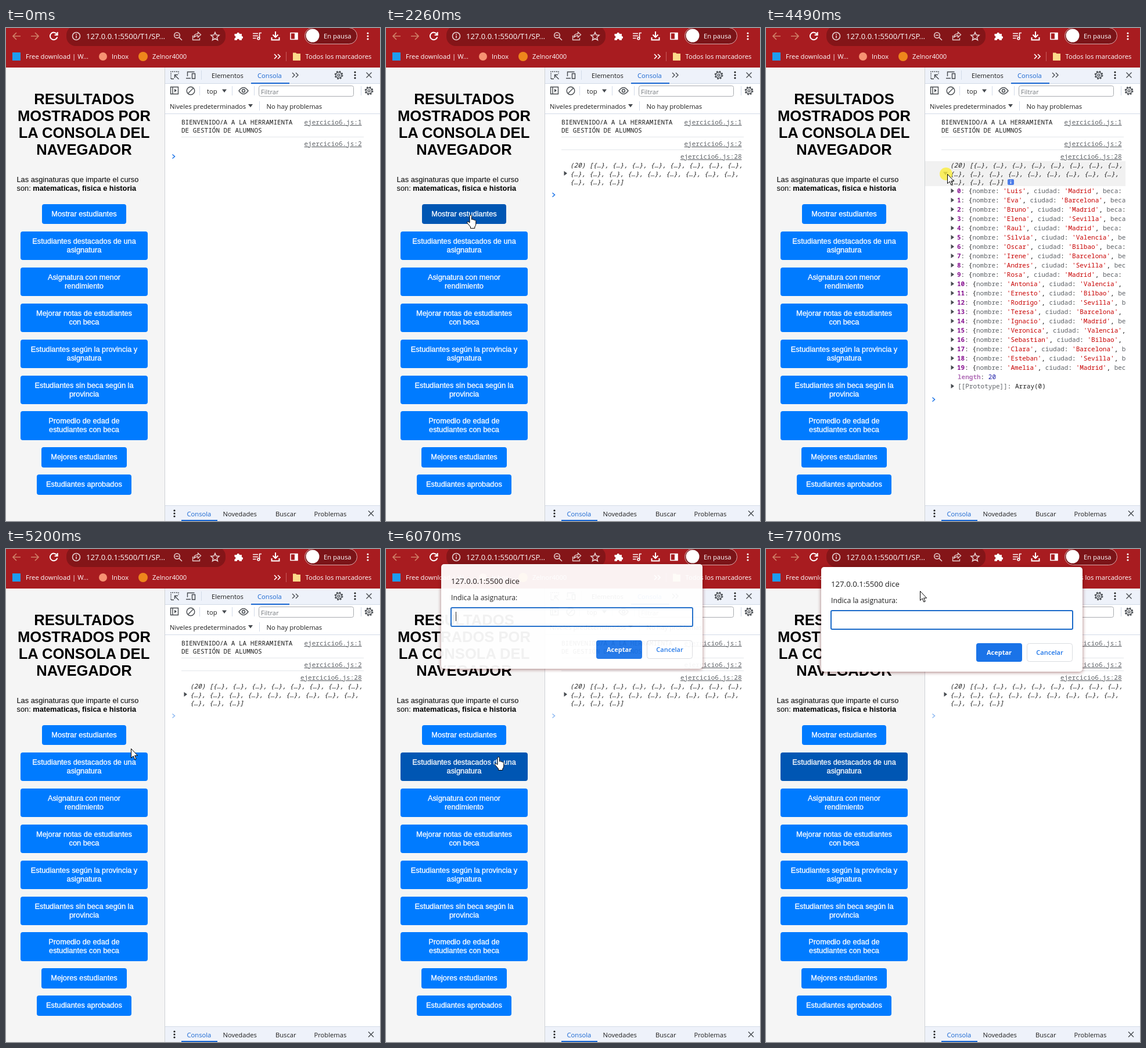
An HTML page for the animation above (8 s loop, 644 by 848 pixels).

```html
<!DOCTYPE html>
<html lang="es">
<head>
<meta charset="utf-8">
<title>Resultados por consola</title>
<style>
html, body { margin: 0; width: 100%; height: 100%; overflow: hidden; background: #fff }
svg { display: block; font: 11.2px "Open Sans", sans-serif; fill: #1f1f1f }
text { white-space: pre }
.page { font: 12.8px "Liberation Sans", Arial, sans-serif; fill: #000 }
.label { fill: #fff; stroke: #fff; stroke-width: .3 }
.mid { text-anchor: middle }
.mono { font: 11px "Noto Sans Mono", monospace }
.link { text-decoration: underline; fill: #5f6368 }
.line { fill: none; stroke: #474b50; stroke-width: 1.4 }
.white { fill: #fff }
.white .line { stroke: #fff; stroke-width: 1.6 }
.sep { fill: none; stroke: #d3dbe8 }
.blue { fill: #1967d2 }
.key { fill: #881391; font-weight: 600 }
.prop { fill: #5f6368 }
.str { fill: #c80000 }
.num { fill: #1a1aa6 }
#dialog { filter: drop-shadow(0 1px 3px #5008) }
</style>
</head>
<body>
<svg id="stage" width="644" height="848" viewBox="0 0 644 848"></svg>
<script>
const text = (x, y, s, attrs = '') => `<text x="${x}" y="${y}" ${attrs}>${s}</text>`;
const path = (d, attrs = 'class="line"') => `<path d="${d}" ${attrs}/>`;
const rect = (x, y, w, h, fill, attrs = '') =>
  `<rect x="${x}" y="${y}" width="${w}" height="${h}" fill="${fill}" ${attrs}/>`;
const disc = (x, y, r, attrs = 'class="line"') => `<circle cx="${x}" cy="${y}" r="${r}" ${attrs}/>`;
const group = (id, body, attrs = '') => `<g id="${id}" ${attrs}>${body}</g>`;
const dots = (x, y) => [-5, 0, 5].map(d => disc(x, y + d, 1.6, '')).join('');
const gear = (x, y) => disc(x, y, 6.4, 'class="line" style="stroke-width:2" stroke-dasharray="2.6 2.43"')
  + disc(x, y, 5) + disc(x, y, 1.9);
const cross = (x, y) => path(`M${x - 4.5} ${y - 4.5}l9 9m0-9l-9 9`);
const chevrons = (x, y) => path(`M${x - 5} ${y - 4}l4 4-4 4m6-8l4 4-4 4`);
const down = (x, y) => path(`M${x - 4} ${y - 2.5}h8l-4 5.5z`, 'fill="#474b50"');
const right = (x, y) => path(`M${x - 2.5} ${y - 4}v8l5.5-4z`, 'fill="#474b50"');

// Browser frame
function browserBar() {
  const dim = 'fill="none" stroke="#d08068" stroke-width="1.7"';
  return rect(0, 0, 644, 68, '#a81c20') + rect(104, -4, 274, 35, '#841518', 'rx="16"')
    + path('M25 14H12m6-6l-6 6 6 6', dim) + path('M43 14h13m-6-6l6 6-6 6', dim)
    + rect(514.5, -.5, 90, 28, '#7b1418', 'rx="14" stroke="#dcaaab"') + disc(528, 13, 11.5, 'fill="#fff"')
    + '<g class="white">'
    + path('M87.5 10.5a6.3 6.3 0 1 0 .8 5M88.7 7v5h-5', 'class="line" style="stroke-width:2"')
    + `<g opacity=".8">${disc(121, 14, 6.5)}${path('M121 13v4.5m0-7.5v1.7')}`
    + disc(294.5, 12.5, 4.7) + path('M298 16l5 5m-11-8.5h5')
    + path('M321.5 13v7.5h12V17M323.5 16c0-4 3-6 7-6V7l5 4.5-5 4.5v-3c-3 0-5 1-7 3z', 'class="line" style="stroke-width:1.3"')
    + path('M360 7.5l2 4.6 5 .4-3.8 3.3 1.2 5-4.4-2.7-4.4 2.7 1.2-5-3.8-3.3 5-.4z') + '</g>'
    + path('M393.5 10h4a2.2 2.2 0 0 1 4.400 0h4v4a2.2 2.2 0 0 1 0 4.400V21h-4a2.2 2.2 0 0 0-4.400 0h-4v-3.500a2 2 0 0 0 0-4z', '')
    + path('M425 9.5h9m-9 4h9m-9 4h5.5M436.5 18V8.5h3.5') + disc(434.8, 18, 2)
    + path('M464 6v10m-4.5-4.5l4.5 4.5 4.5-4.5M457.5 16v4.5h13V16', 'class="line" style="stroke-width:2"')
    + path('M490 8.5h12v11h-12z') + rect(497, 8, 5, 12, '#fff') + dots(623, 14)
    + text(138, 18.5, '127.0.0.1:5500/T1/SP...', 'font-size="13"')
    + text(547, 18, 'En pausa')
    + text(34, 53, 'Free download | W...') + text(182, 53, 'Inbox') + text(252, 53, 'Zelnor4000')
    + text(515.5, 53, 'Todos los marcadores') + chevrons(467, 49) + '</g>'
    + rect(11, 42, 14, 14, '#1e9cf0') + disc(167, 49, 7, 'fill="#f79272"') + disc(236, 49, 8, 'fill="#ee861c"')
    + path('M482.5 41v16', 'stroke="#c95a5d"') + path('M494 42.5h5l1.5 1.5h6.5v12h-13z', 'fill="#fbd98a"');
}

// Web page
const buttons = [
  [62, 303, 145, 34, 'Mostrar estudiantes'],
  [25, 350, 219, 49, 'Estudiantes destacados de una', 'asignatura'],
  [25, 412, 219, 49, 'Asignatura con menor', 'rendimiento'],
  [25, 474, 219, 49, 'Mejorar notas de estudiantes', 'con beca'],
  [25, 536, 219, 49, 'Estudiantes según la provincia y', 'asignatura'],
  [25, 598, 219, 49, 'Estudiantes sin beca según la', 'provincia'],
  [25, 659, 219, 50, 'Promedio de edad de', 'estudiantes con beca'],
  [61, 721, 147, 35, 'Mejores estudiantes'],
  [53, 768, 163, 35, 'Estudiantes aprobados']
];
function webPage() {
  const title = ['RESULTADOS', 'MOSTRADOS POR', 'LA CONSOLA DEL', 'NAVEGADOR'];
  return rect(0, 68, 273, 780, '#f5f5f5') + '<g class="page">'
    + title.map((s, i) => text(134.5, 131 + 29 * i, s, 'class="mid" font-size="25.6" font-weight="bold"')).join('')
    + text(18.5, 265, 'Las asginaturas que imparte el curso')
    + text(18.5, 280, 'son: <tspan font-weight="bold">matematicas, fisica e historia</tspan>')
    + buttons.map(([x, y, w, h, ...lines], i) => rect(x, y, w, h, '#007bff', `rx="4" id="button${i}"`)
      + lines.map((s, n) => text(134.5, y + 21 + 15 * n, s, 'class="mid label"')).join('')).join('')
    + '</g>';
}

// Developer tools
function devTools() {
  return rect(274, 68, 370, 27, '#eef2fa') + rect(274, 822, 370, 26, '#eef2fa')
    + path('M273.5 68v780', 'stroke="#cfd2d6"')
    + path('M274 95.5h370M336.5 73v16M333.5 100v16M389.5 100v16M427.5 100v16M611.5 100v16M436.5 126v16M274 147.5h370M274 821.5h370', 'class="sep"')
    + rect(422, 94, 66, 2, '#1967d2') + rect(302, 846, 62, 2, '#1967d2')
    + path('M284 87V75h13v4', 'class="line" stroke-dasharray="2 1.5"') + path('M284 87.5h5M297.5 88l-7-7m0 5v-5.5h5.5')
    + path('M312.5 83v-7.5h12M310 86.5h8') + path('M320.5 78.5h5v8.5h-5z')
    + text(354, 86, 'Elementos') + text(433, 86, 'Consola', 'class="blue"') + chevrons(498, 81)
    + gear(573, 81) + dots(601, 81) + cross(625, 81)
    + path('M283.5 101.5h13v12h-13zM287 101.5v12') + path('M290 104.5v6l4-3z', 'fill="#474b50"')
    + disc(318, 108, 6.8) + path('M313.3 112.7l9.4-9.4')
    + text(346, 113, 'top') + down(376, 108)
    + path('M401 108q8-11 16 0q-8 11-16 0z') + disc(409, 108, 2.5)
    + rect(435.5, 99.5, 163, 18, '#fff', 'rx="3" stroke="#a8abb0"') + text(439, 113.5, 'Filtrar', 'fill="#75797e"')
    + gear(625, 108)
    + text(282, 139, 'Niveles predeterminados') + down(421, 133.5) + text(448.5, 139, 'No hay problemas')
    + dots(290, 835) + text(311.5, 840, 'Consola', 'class="blue"') + text(373.5, 840, 'Novedades')
    + text(464, 840, 'Buscar') + text(530.5, 840, 'Problemas') + cross(628.5, 835);
}

// Console output
const names = 'Luis Eva Bruno Elena Raul Silvia Oscar Irene Andres Rosa Antonia Ernesto Rodrigo Teresa Ignacio Veronica Sebastian Clara Esteban Amelia'.split(' ');
const cities = ['Madrid', 'Barcelona', 'Sevilla', 'Valencia', 'Bilbao'];
const cityOf = [...'01020341203421034120'];
const span = (cls, s) => `<tspan class="${cls}">${s}</tspan>`;
const items = n => Array(n).fill('{…}').join(', ');

function consoleLog() {
  const link = (y, n) => text(612.5 - 6.6 * (14 + n.length), y, 'ejercicio6.js:' + n, 'class="link"');
  const rows = names.map((name, i) => right(321, 280 + 16 * i) + text(329, 284 + 16 * i,
    `${span('key', i)}: {${span('prop', 'nombre')}: ${span('str', `'${name}'`)}, ${span('prop', 'ciudad')}: `
    + `${span('str', `'${cities[cityOf[i]]}'`)}, ${span('prop', 'beca')}: true`)).join('');
  const italic = 'font-style="italic"';
  return '<g class="mono">' + text(302, 166, 'BIENVENIDO/A A LA HERRAMIENTA') + text(302, 180, 'DE GESTIÓN DE ALUMNOS')
    + link(166, '1') + link(203, '2') + path('M302 187.5h314', 'stroke="#e3e6ea"')
    + group('log', rect(274, 229, 345, 43, '#f1f1f1', 'id="rowHover"')
      + path('M302 209.5h314', 'stroke="#e3e6ea"') + link(225, '28')
      + text(317, 240, `(20) [${items(8)},`, italic) + text(317, 254.5, items(9) + ',', italic)
      + text(317, 269, items(3) + ']', italic)
      + group('closed', right(309, 250))
      + group('open', down(309, 250) + rect(416, 260, 11, 10, '#4d7de8', 'rx="2"')
        + path('M421.5 264v4m0-6.5v1.3', 'stroke="#fff" stroke-width="1.3"')
        + `<clipPath id="clip"><rect x="274" y="272" width="345" height="360"/></clipPath><g clip-path="url(#clip)">${rows}</g>`
        + text(330, 604, `<tspan fill="#b26fb8" font-weight="600">length</tspan>: ${span('num', '20')}`)
        + right(321, 616) + text(330, 620, `${span('prop', '[[Prototype]]')}: Array(0)`)))
    + '</g>' + path('M286.5 217.5l4 3.5-4 3.5', 'id="prompt" fill="none" stroke="#1a73e8" stroke-width="1.5"');
}

function promptDialog() {
  return rect(95, 31, 450, 180, '#fff', 'rx="5"')
    + text(112, 65, '127.0.0.1:5500 dice', 'font-size="13.2"') + text(112, 93, 'Indica la asignatura:', 'font-size="12.3"')
    + rect(112, 106, 416, 32, '#fff', 'rx="2" stroke="#1b6ac9" stroke-width="2"')
    + rect(120, 113, 1, 16, '#222', 'id="caret"')
    + rect(362, 162, 79, 32, '#1a73e8', 'rx="4"') + rect(449.5, 162.5, 78, 31, '#fff', 'rx="4" stroke="#dadce0"')
    + text(401.5, 182, 'Aceptar', 'class="mid white" font-weight="700" font-size="11"')
    + text(488.5, 182, 'Cancelar', 'class="mid" fill="#1a73e8" font-weight="600" font-size="11"');
}

function pointer() {
  const ink = 'fill="#fff" stroke="#000" stroke-linejoin="round"';
  return disc(-2, 0, 11, 'id="halo" fill="#fbee3c"')
    + path('M.5.5V16.5l3.7-3.4 2.6 6 2.4-1-2.6-5.8h5z', ink + ' id="arrow"')
    + path('M-1 13V2.5a1.7 1.7 0 0 1 3.4 0V8.5a1.5 1.5 0 0 1 2.7.6a1.5 1.5 0 0 1 2.5.8a1.4 1.4 0 0 1 2.2 1.3V16q0 3-2 5v2.5H.5V21L-5 14.5q-1-2 .5-2.5 1.5-.3 3.5 2z', ink + ' id="hand"')
    + path('M-3-8.5h2.5l.5.5.5-.5H3M0-8V8M-3 8.5h2.5L0 8l.5.5H3', 'id="beam" fill="none" stroke="#000"');
}

const stage = document.getElementById('stage');
stage.innerHTML = browserBar() + webPage() + devTools() + consoleLog()
  + group('dialog', promptDialog()) + group('pointer', pointer());
const el = Object.fromEntries([...stage.querySelectorAll('[id]')].map(e => [e.id, e]));

// Motion
const route = [
  [360, 590, 846], [1150, 171, 334], [1340, 165, 320], [1500, 144, 322], [1690, 144, 322], [1710, 140, 323],
  [2200, 140, 323], [2810, 312, 250], [3080, 312, 251], [4640, 312, 251], [5260, 212, 345],
  [5360, 212, 345], [5680, 193, 357], [6350, 193, 357], [6960, 239, 128], [7170, 239, 128], [7480, 265, 72]
];
const presses = [2020, 3240, 4490, 5840];
const clamp = v => Math.max(0, Math.min(1, v));
const smooth = v => v * v * (3 - 2 * v);
const within = (t, a, b) => t >= a && t < b;
const show = (id, on) => el[id].style.display = on ? '' : 'none';

function place(t) {
  const i = route.findIndex(k => k[0] > t);
  if (i < 0) return route.at(-1).slice(1);
  const [t0, x0, y0] = route[Math.max(0, i - 1)], [t1, x1, y1] = route[i];
  const p = smooth(clamp((t - t0) / (t1 - t0 || 1)));
  return [x0 + (x1 - x0) * p, y0 + (y1 - y0) * p];
}

function tint(id, level) {
  el[id].setAttribute('fill', `rgb(0,${123 - 37 * level},${255 - 76 * level})`);
}

function draw(t) {
  const [x, y] = place(t);
  const hand = within(t, 1110, 2400) || within(t, 5375, 6390);
  const beam = within(t, 6850, 7260);
  show('pointer', t >= 360);
  el.pointer.setAttribute('transform', `translate(${Math.round(x)} ${Math.round(y)})`);
  show('hand', hand);
  show('beam', beam);
  show('arrow', !hand && !beam);
  const press = presses.findLast(p => p <= t) ?? -999;
  el.halo.setAttribute('opacity', .8 * clamp((220 - t + press) / 110));

  tint('button0', smooth(clamp((t - 1110) / 300)) - smooth(clamp((t - 2400) / 300)));
  tint('button1', smooth(clamp((t - 5375) / 300)));

  const logged = t >= 2110, open = within(t, 3330, 4590);
  show('log', logged);
  show('rowHover', within(t, 2640, 4900));
  show('open', open);
  show('closed', !open);
  el.prompt.setAttribute('transform', `translate(0 ${open ? 418 : logged ? 66 : 0})`);
  el.prompt.setAttribute('opacity', t < 4590 ? 1 : .5);

  const p = clamp((t - 5880) / 250);
  show('dialog', p > 0);
  el.dialog.setAttribute('transform', `translate(0 ${Math.round(-20 * (1 - p))})`);
  el.dialog.setAttribute('opacity', 1 - (1 - p) ** 2);
  show('caret', t < 6640 || within(t, 7170, 7700));
}

const start = performance.now();
function tick() {
  draw((performance.now() - start) % 8000);
  requestAnimationFrame(tick);
}
tick();
</script>
</body>
</html>
```
